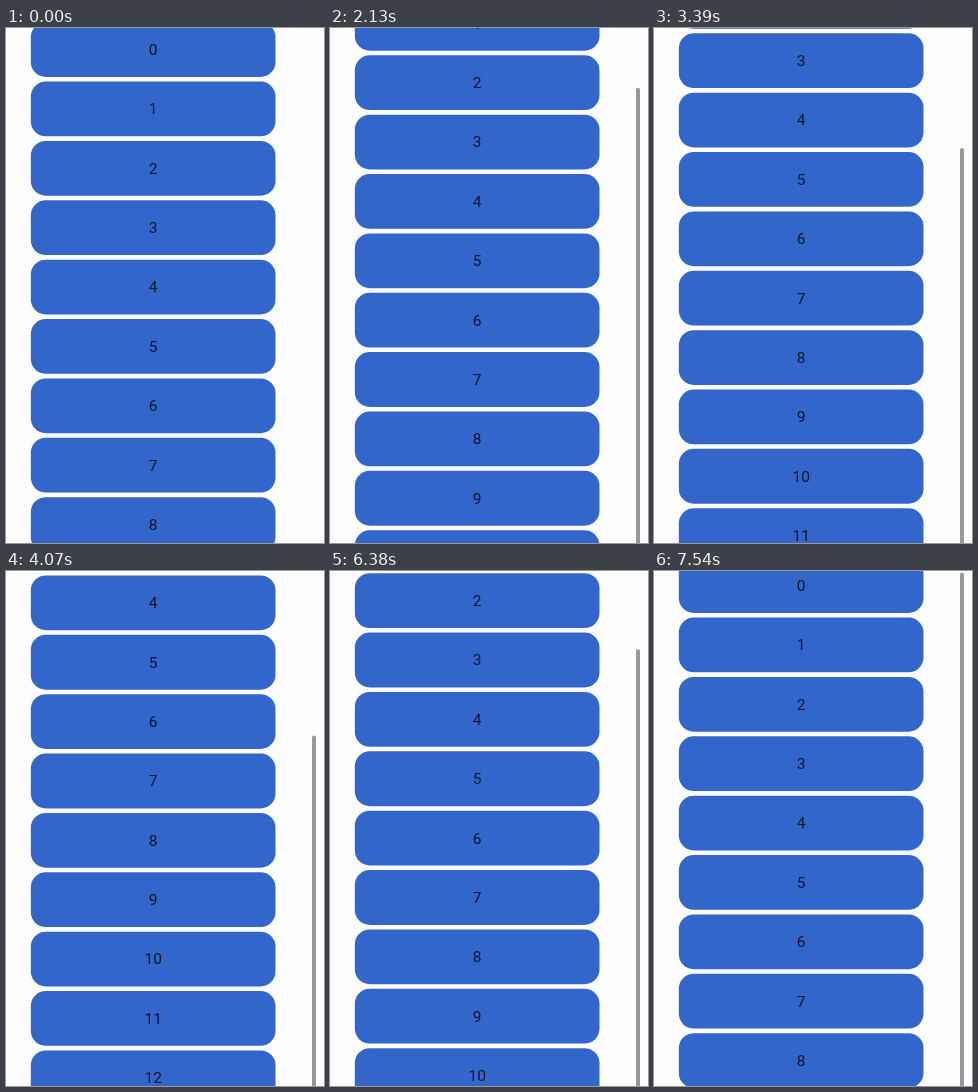
An HTML page with a canvas for the animation above (8.41 s loop, 318 px wide and 515 px high).

```html
<!DOCTYPE html>
<html lang="en">
<head>
<meta charset="utf-8">
<title>Scrolling list</title>
<style>
  html, body { margin: 0; width: 100%; height: 100%; overflow: hidden; background: #fefefe; }
  canvas { display: block; width: 318px; height: 515px; }
</style>
</head>
<body>
<canvas id="stage"></canvas>
<script>
const W = 318, H = 515, LOOP = 8410, TICK = 40;
const PITCH = 59.37, ITEM_H = 54.8, FIRST_Y = 21.6;

// Drags: first change, last change, scroll offset reached
const drags = [
  [830, 1270, 50],
  [1850, 2290, 103.5],
  [2910, 3790, 215.9],
  [3990, 4230, 242.3],
  [4770, 5490, 166.5],
  [5860, 6620, 86.8],
  [6780, 7540, 7]
];

const canvas = document.getElementById('stage');
const ctx = canvas.getContext('2d');
const dpr = window.devicePixelRatio || 1;
canvas.width = Math.round(W * dpr);
canvas.height = Math.round(H * dpr);
ctx.scale(dpr, dpr);

function scrollAt(t) {
  let pos = 0;
  for (const [start, end, to] of drags) {
    if (t < start) break;
    const steps = (end - start) / TICK + 1;
    const done = Math.min(steps, Math.floor((t - start) / TICK) + 1);
    pos += (to - pos) * done / steps;
  }
  return pos;
}

function roundBox(x, y, w, h, r, color) {
  ctx.fillStyle = color;
  ctx.beginPath();
  ctx.roundRect(x, y, w, h, r);
  ctx.fill();
}

function draw(t) {
  const scroll = scrollAt(t);
  ctx.fillStyle = '#fefefe';
  ctx.fillRect(0, 0, W, H);

  ctx.font = '15.5px Roboto, "Open Sans", sans-serif';
  ctx.textAlign = 'center';
  for (let i = 0; i < 14; i++) {
    const y = FIRST_Y + i * PITCH - scroll;
    if (y < -ITEM_H || y > H + ITEM_H) continue;
    roundBox(24.8, y - ITEM_H / 2, 244.7, ITEM_H, 15, '#3366cb');
    ctx.fillStyle = '#0d1626';
    ctx.fillText(i, 147.2, y + 5.4);
  }

  if (t >= drags[0][0]) {
    roundBox(306, 0.74 * scroll - 3.7, 4, 600, 2, '#999');
  }
}

function frame() {
  draw(performance.now() % LOOP);
  requestAnimationFrame(frame);
}
frame();
</script>
</body>
</html>
```
